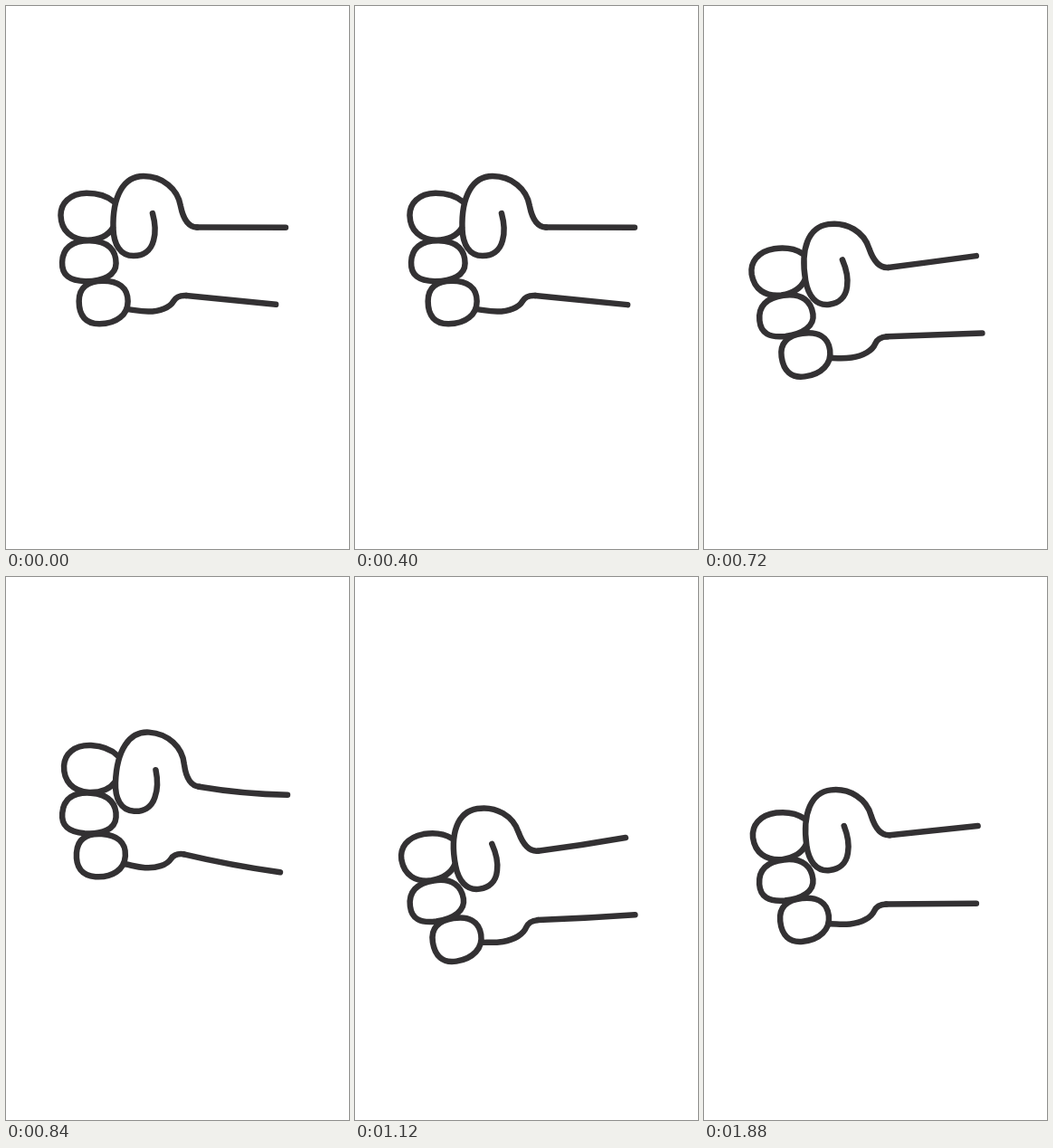
An HTML page with a canvas for the animation above (1920 ms loop, 379x600 px).

```html
<!DOCTYPE html>
<html lang="en">
<head>
<meta charset="utf-8">
<title>Shaking fist</title>
<style>
  html, body { margin: 0; width: 100%; height: 100%; overflow: hidden; background: #fff; }
  canvas { display: block; width: 379px; height: 600px; }
</style>
</head>
<body>
<canvas id="stage"></canvas>
<script>
const W = 379, H = 600, LOOP = 1920, STEP = 40, BEAT = 400;
const UP = -26, DOWN = 66, STRIKE = 76.5, REST = 51.5;
const canvas = document.getElementById('stage');
const ratio = window.devicePixelRatio || 1;
canvas.width = W * ratio;
canvas.height = H * ratio;
const ctx = canvas.getContext('2d');

const hand = {
  topFinger: 'M119 217C111 210 100 207.5 89 207.5C70 208 60.5 219 60.5 232C61 249 72 259 90 259.5C103 259 113 254 118 246',
  midFinger: 'M92 260C73 260 62.5 268 62 284C61.5 298 70 304.5 88 305C108 305 121.5 298 121.5 285C121.5 272 114 260 92 260Z',
  lowFinger: 'M107 304.5C91 304.5 80.5 311 80.5 327C80.5 343 88 352 103 352C122 352 134.5 342 134.5 327C134.5 312 124 304.5 107 304.5Z',
  thumb: 'M162 230C165 241 166 250 163 260C160 272 151 277 141 277C126 277 119 264 118.5 247C117.5 211 130 189 152 189C173 189 190 203 193 222C195 232 200 245 211 245.5',
  wrist: 'M135 336C143 337 148 338.5 157 338.5C170 338.5 181 334 185 327C188 322 192 320.5 199 321'
};
const outline = Object.values(hand).map(d => new Path2D(d));
const pivot = { x: 100, y: 270 };

const mix = (a, b, u) => a + (b - a) * u;
const wave = (t, peak) => Math.cos(2 * Math.PI * (t - peak) / BEAT);
const ease = (t, from, to) => {
  const u = Math.min(1, Math.max(0, (t - from) / (to - from)));
  return (1 - Math.cos(Math.PI * u)) / 2;
};
const bump = (t, mid, half) => 1 - ease(Math.abs(t - mid), 0, half);

// The fist swings twice, then strikes low and settles
function height(t) {
  if (t < 880) return mix(UP, DOWN, ((1 - wave(t, 90)) / 2) ** 1.5);
  return mix(UP, STRIKE, ease(t, 880, 1070)) + (REST - STRIKE) * ease(t, 1070, 1320);
}

function turn(t) {
  const degrees = -1.9 + 7.2 * wave(Math.min(t, 1084), 84) + 2.9 * ease(t, 1084, 1320);
  return degrees * Math.PI / 180;
}

function drawArm(x1, y1, x2, y2, bend) {
  ctx.beginPath();
  ctx.moveTo(x1, y1);
  ctx.quadraticCurveTo((x1 + x2) / 2, (y1 + y2) / 2 + bend, x2, y2);
  ctx.stroke();
}

function draw(t) {
  const dy = height(t);
  const lag = 2.2 * bump(t, 840, 160);
  const bend = 4.5 * bump(t, 920, 300) - 2.5 * bump(t, 600, 200);
  const extra = 3 * ease(t, 0, 200) + 5.4 * ease(t, 600, 840) - 8.4 * ease(t, 1000, 1900);

  ctx.setTransform(ratio, 0, 0, ratio, 0, 0);
  ctx.fillStyle = '#fff';
  ctx.fillRect(0, 0, W, H);
  ctx.strokeStyle = '#333133';
  ctx.lineWidth = 6.5;
  ctx.lineCap = ctx.lineJoin = 'round';

  ctx.translate(pivot.x - 0.05 * dy, pivot.y + dy);
  ctx.rotate(turn(t));
  ctx.translate(-pivot.x, -pivot.y);
  outline.forEach(path => ctx.stroke(path));
  drawArm(211, 245.5, 309, 246 + lag, bend);
  drawArm(199, 321, 298 + extra, 331 + lag + extra * 0.1, bend * 0.7);
}

let start = null;
function tick(now) {
  if (start === null) start = now;
  const t = Math.max(0, now - start) % LOOP;
  draw(Math.floor(t / STEP) * STEP);
  requestAnimationFrame(tick);
}
draw(0);
requestAnimationFrame(tick);
</script>
</body>
</html>
```
